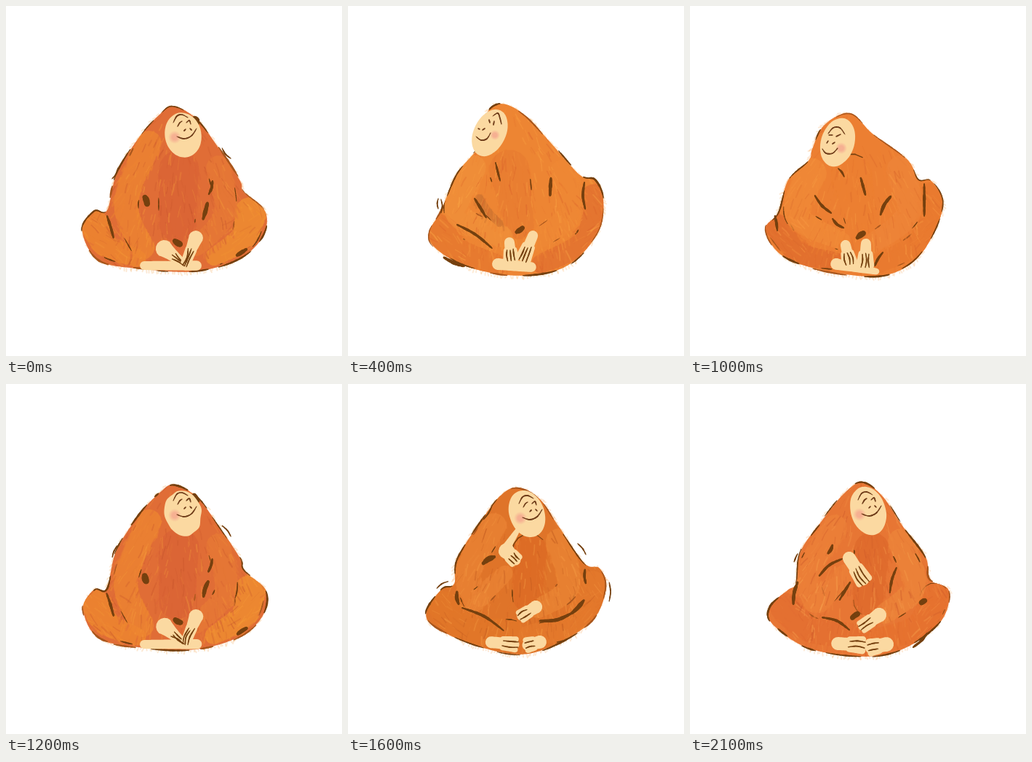
An HTML page with a canvas that plays this animation: 462 px wide and 480 px high, repeating every 2.2 s.

```html
<!DOCTYPE html>
<html lang="en">
<head>
<meta charset="utf-8">
<title>Orangutan</title>
<style>
html, body { margin: 0; width: 100%; height: 100%; overflow: hidden; background: #fff; }
canvas { display: block; width: 462px; height: 480px; }
</style>
</head>
<body>
<canvas id="stage" width="462" height="480"></canvas>
<script>
const W = 462, H = 480, STEP = 100;
const INK = '#75400f', SKIN = '#fbd9a1';
const numbers = s => s.trim().split(/\s+/).map(Number);
const pairs = n => Array.from({ length: n.length >> 1 }, (_, i) => [n[2 * i], n[2 * i + 1]]);

function random(seed) {
  return () => {
    seed = seed + 0x6D2B79F5 | 0;
    let t = Math.imul(seed ^ seed >>> 15, 1 | seed);
    t = t + Math.imul(t ^ t >>> 7, 61 | t) ^ t;
    return ((t ^ t >>> 14) >>> 0) / 4294967296;
  };
}

// Catmull-Rom curve sampled every couple of pixels.
function curve(p, closed) {
  const n = p.length, out = [];
  const at = i => closed ? p[(i + n) % n] : p[Math.max(0, Math.min(n - 1, i))];
  for (let i = 0; i < (closed ? n : n - 1); i++) {
    const [a, b, c, d] = [at(i - 1), at(i), at(i + 1), at(i + 2)];
    const m = Math.max(2, Math.ceil(Math.hypot(c[0] - b[0], c[1] - b[1]) / 2));
    for (let k = 0; k < m; k++) {
      const t = k / m;
      out.push([0, 1].map(j => b[j] + .5 * t * (c[j] - a[j] + t * (2 * a[j] - 5 * b[j] + 4 * c[j] - d[j]
        + t * (3 * (b[j] - c[j]) + d[j] - a[j])))));
    }
  }
  if (!closed) out.push(p[n - 1]);
  return out;
}

// Closed outline of a round-ended limb whose half-width runs from w0 to w1.
function tube(p, w0, w1) {
  const c = curve(p), n = c.length - 1, left = [], right = [];
  const turn = i => {
    const a = c[Math.max(0, i - 1)], b = c[Math.min(n, i + 1)];
    return Math.atan2(b[1] - a[1], b[0] - a[0]);
  };
  const put = (list, i, w, angle) =>
    list.push([c[i][0] + w * Math.cos(angle), c[i][1] + w * Math.sin(angle)]);
  for (let i = 0; i <= n; i++) {
    const w = w0 + (w1 - w0) * i / n, a = turn(i);
    put(left, i, w, a - Math.PI / 2);
    put(right, i, w, a + Math.PI / 2);
  }
  const tip = [], root = [];
  for (let k = 1; k < 8; k++) {
    const a = Math.PI * (k / 8 - .5);
    put(tip, n, w1, turn(n) + a);
    put(root, 0, w0, turn(0) + Math.PI + a);
  }
  return [...left, ...tip, ...right.reverse(), ...root];
}

// Face lines as "width x y x y / ...", cheek as x, y, radius.
const looks = {
  up: {
    cheek: [232, 180, 9],
    lines: '2 230 160 235 151 242 149 250 153/2 236 165 239 160 242 158/2 248 160 252 157 254 162/2 245 171 247 169/2 253 168 255 170/2 235 179 245 182 255 178 262 168'
  },
  side: {
    cheek: [202, 177, 7],
    lines: '2 199 151 206 147 209 154 211 162/2 194 156 195 160/2 201 158 200 163/2 179 168 181 169/2 185 170 188 168/2 176 179 183 184 191 182 196 174'
  },
  calm: {
    cheek: [208, 195, 8],
    lines: '2 190 175 197 167 206 167 213 176/2 191 177 196 177/2 201 179 207 176/2 188 188 190 185/2 196 189 199 187/2 182 196 187 202 196 202 203 195'
  },
  pout: {
    cheek: [233, 178, 9],
    lines: '2 230 160 234 153 240 158 245 155 251 158/2 236 164 243 161/2 244 167 247 165/2 241 172 243 174/3 252 171 253 177/2 256 170 258 176'
  }
};

// limbs: "colour w0 w1 x y ..."   hands: "x0 y0 x1 y1 w0 w1 fingerLines"   ink: "width x y x y"
const poses = {};

poses.rest = {
  base: '#e06d36', light: '#f39a3a', dark: '#c4532b', crown: [235, 130],
  outline: '211 149 230 137 262 155 294 197 322 240 327 255 357 283 352 318 320 347 262 364 190 361 128 349 105 308 122 281 139 280 152 230 184 179',
  limbs: '#ef892e 20 12 122 300 138 328 180 346/#f0902f 22 12 336 284 326 318 286 344/#da6335 28 24 238 225 235 300/#ee8630 17 16 197 188 165 270 188 332/#e77a35 17 13 292 222 301 285 262 330',
  hands: '190 356 262 356 6 8 0/218 333 241 351 12 5 3/261 318 248 350 10 6 3',
  ink: '9 191 262 194 272/6 277 270 271 292/4 284 240 279 258/9 232 322 240 327/7 259 153 264 161/4 139 288 148 318/6 318 342 330 334/2 146 237 154 222/2 297 195 309 209',
  face: [243.5, 177, 25, 31, -.2], look: 'up', shift: [0, 0]
};

poses.left = {
  base: '#ed8533', light: '#faa645', dark: '#d8622a', crown: [222, 128],
  outline: '185 163 196 140 217 135 246 152 280 189 319 232 340 239 351 268 343 312 300 357 236 370 165 358 119 331 112 309 128 281 149 231 178 195',
  limbs: '#e6772e 20 14 125 305 150 335 205 355/#e2702f 18 13 338 262 328 320 265 354/#e87c30 28 20 222 225 236 300/#f1903a 18 15 172 222 150 283 212 317/#ef8834 20 13 297 230 305 285 252 325/#cf7430 6 5 180 264 194 284 208 298',
  hands: '206 354 252 358 8 8 0/222 324 224 345 7 9 3/254 315 242 344 7 9 3',
  ink: '4 174 264 190 290/5 279 236 278 260/8 232 310 240 304/4 325 242 326 278/4 150 300 198 332/5 132 345 160 357/3 203 215 209 240/2 124 264 124 278/2 128 265 128 284',
  face: [195, 174, 22, 34, .45], look: 'side', shift: [0, 0]
};

poses.low = {
  base: '#ec7f32', light: '#f79c43', dark: '#d9682b', crown: [225, 140],
  outline: '168 196 184 164 219 147 252 176 299 211 314 238 332 240 348 273 328 325 299 357 254 371 180 362 125 341 104 306 121 283 135 239 163 212',
  limbs: '#df6b2d 17 12 120 302 150 338 200 350/#e9792e 18 13 332 260 318 320 258 354/#ec7f30 28 20 222 230 236 300/#f08a37 22 12 166 230 148 288 210 323/#ee8439 20 13 290 225 300 285 247 328',
  hands: '201 354 256 364 8 5 0/214 328 219 350 7 9 3/242 326 241 353 7 10 3',
  ink: '4 172 260 194 284/4 196 292 211 304/4 235 236 241 259/5 276 261 262 286/8 230 318 239 311/4 322 244 322 288/4 117 288 120 308/4 265 338 254 356/3 204 223 212 234',
  face: [203, 187, 23, 34, .3], look: 'calm', shift: [0, 0]
};

poses.think = {
  base: '#df7429', light: '#f49c43', dark: '#bd571f', crown: [235, 132],
  outline: '211 152 234 142 264 158 290 196 325 246 346 253 355 280 337 323 286 357 236 371 174 358 119 333 108 312 129 281 146 274 150 240 185 185',
  limbs: '#e27729 22 17 132 306 165 336 225 340/#e57a2d 20 14 336 276 310 328 248 345/#dc6a25 24 20 250 230 246 292/#ea8534 18 13 290 216 303 278 262 308/#ea8335 17 18 201 194 166 255 174 294/#ea8335 14 11 182 292 216 260',
  hands: '214 230 236 196 7 3 0/218 229 230 241 11 9 3/258 306 239 318 9 8 2/197 354 228 357 8 9 2/264 354 247 358 9 9 2',
  ink: '8 186 246 201 237/5 150 285 152 302/4 157 307 214 338/5 264 325 308 314/6 308 314 324 297/4 326 255 327 273/2 122 280 138 271/2 186 186 198 167/2 316 219 327 234/2 359 272 359 298',
  face: [246, 178, 24, 33, -.35], look: 'up', shift: [5, 4]
};

poses.chest = {
  base: '#e77634', light: '#f6a04d', dark: '#ca5729', crown: [238, 128],
  outline: '211 151 236 135 264 153 292 194 324 238 329 268 356 283 345 325 296 362 237 374 162 362 113 329 110 305 134 283 146 273 152 230 181 188',
  limbs: '#e36e31 20 16 130 306 165 336 225 345/#e6712e 20 14 336 293 312 334 255 350/#de692b 25 20 250 228 245 298/#ec853a 18 14 290 216 308 278 268 315/#ec8138 17 16 199 196 165 255 171 298/#ec8138 16 13 178 298 213 260',
  hands: '219 239 238 268 9 10 3/260 317 238 332 10 8 2/203 356 235 358 9 10 2/270 357 249 361 10 10 2',
  ink: '4 178 263 209 240/5 190 232 196 221/4 220 272 206 296/8 223 321 231 315/5 148 272 142 302/4 182 320 219 337/4 284 252 275 286/8 318 300 323 297/4 307 361 326 342/2 143 244 148 233/2 310 233 316 244',
  face: [245, 174, 24, 34, -.3], look: 'up', shift: [1, -1]
};

function paint(pose, seed, lookName = pose.look) {
  const cv = document.createElement('canvas');
  cv.width = W; cv.height = H;
  const g = cv.getContext('2d'), rnd = random(seed);
  const vary = r => (rnd() * 2 - 1) * r;
  const wobble = seed % 2 ? .2 : 1.2;
  const shake = p => p.map(([x, y]) => [x + vary(wobble), y + vary(wobble)]);
  g.lineCap = g.lineJoin = 'round';

  function trace(p) {
    const path = new Path2D();
    p.forEach(q => path.lineTo(...q));
    path.closePath();
    return path;
  }

  function fill(p, color, alpha = 1) {
    g.globalAlpha = alpha;
    g.fillStyle = color;
    g.fill(trace(p));
    g.globalAlpha = 1;
  }

  function hair(x, y, angle, length, width, color, alpha) {
    const bend = angle + vary(.2);
    g.globalAlpha = alpha;
    g.strokeStyle = color;
    g.lineWidth = width;
    g.beginPath();
    g.moveTo(x, y);
    g.quadraticCurveTo(x + Math.cos(bend) * length / 2, y + Math.sin(bend) * length / 2,
      x + Math.cos(angle) * length, y + Math.sin(angle) * length);
    g.stroke();
    g.globalAlpha = 1;
  }

  function brush(p, width, color = INK) {
    g.strokeStyle = color;
    for (let i = 1; i < p.length; i++) {
      g.lineWidth = width * (.45 + .5 * Math.sin(Math.PI * i / p.length)) * (.8 + rnd() * .35);
      g.beginPath();
      g.moveTo(...p[i - 1]);
      g.lineTo(...p[i]);
      g.stroke();
    }
  }

  // Straight mark with a slight random bow.
  function mark(width, x0, y0, x1, y1) {
    const bow = vary(.1);
    const mid = [(x0 + x1) / 2 + (y1 - y0) * bow, (y0 + y1) / 2 - (x1 - x0) * bow];
    brush(curve(shake([[x0, y0], mid, [x1, y1]])), width);
  }

  function contour(p, width, run, gap) {
    for (let i = Math.floor(rnd() * gap); i < p.length;) {
      const size = run * (.4 + rnd()), dx = vary(.8), dy = vary(.8);
      brush(p.slice(i, i + size).map(([x, y]) => [x + dx, y + dy]),
        width * (.7 + rnd() * .7), rnd() < .3 ? '#a9571d' : INK);
      i += Math.floor(size + gap * (.3 + rnd()));
    }
  }

  function flow(x, y) {
    if (y > 285 && Math.abs(x - 235) > 78) return x < 235 ? .75 : 2.4;
    return Math.atan2(y - pose.crown[1], (x - pose.crown[0]) * .8);
  }

  function fur(p, color, density) {
    const xs = p.map(q => q[0]), ys = p.map(q => q[1]);
    const x0 = Math.min(...xs), y0 = Math.min(...ys);
    const w = Math.max(...xs) - x0, h = Math.max(...ys) - y0;
    g.save();
    g.clip(trace(p));
    for (let i = w * h * density; i > 0; i--) {
      const x = x0 + rnd() * w, y = y0 + rnd() * h, pick = rnd();
      const tone = pick < .4 ? pose.light : pick < .75 ? pose.dark : color;
      hair(x, y, flow(x, y) + vary(.3), 6 + rnd() * 14, .7 + rnd() * 1.6, tone, .13 + rnd() * .32);
    }
    g.restore();
  }

  function limb(text) {
    const [color, ...rest] = text.split(' ');
    const [w0, w1, ...n] = rest.map(Number);
    const p = tube(shake(pairs(n)), w0, w1);
    fill(p, color, .75);
    for (let i = 0; i < p.length; i += 3) {
      hair(...p[i], flow(...p[i]) + vary(.3), 8, 2.4, rnd() < .5 ? color : pose.base, .45);
    }
    fur(p, color, .009);
    contour(p, 1.6, 9, 50);
  }

  function hand(text) {
    const [x0, y0, x1, y1, w0, w1, fingers] = numbers(text);
    const [a, b] = shake([[x0, y0], [x1, y1]]);
    const d = Math.atan2(b[1] - a[1], b[0] - a[0]);
    const at = (t, s) => {
      const w = (w0 + (w1 - w0) * t) * s;
      return [a[0] + (b[0] - a[0]) * t - Math.sin(d) * w, a[1] + (b[1] - a[1]) * t + Math.cos(d) * w];
    };
    fill(tube([a, b], w0, w1 * .85), SKIN);
    for (let k = 0; k <= fingers && fingers; k++) {
      const s = 2 * k / fingers - 1;
      fill(tube([at(.5, s * .7), at(1.08, s * .8)], w1 * .4, w1 * .42), SKIN);
    }
    for (let k = 0; k < fingers; k++) {
      const s = (2 * k + 1) / fingers - 1;
      mark(2, ...at(.45 + rnd() * .15, s * .8), ...at(1.2, s * .8));
    }
  }

  function face() {
    const [cx, cy, rx, ry, tilt] = pose.face, rim = [];
    for (let k = 0; k < 16; k++) {
      const a = k * Math.PI / 8, x = rx * Math.cos(a), y = ry * Math.sin(a);
      rim.push([cx + x * Math.cos(tilt) - y * Math.sin(tilt), cy + x * Math.sin(tilt) + y * Math.cos(tilt)]);
    }
    fill(curve(shake(rim), true), SKIN);
    const look = looks[lookName], [x, y, r] = look.cheek;
    g.save();
    g.translate(...pose.shift);
    const blush = g.createRadialGradient(x, y, r * .4, x, y, r);
    blush.addColorStop(0, 'rgba(245,169,143,.85)');
    blush.addColorStop(1, 'rgba(245,169,143,0)');
    g.fillStyle = blush;
    g.fillRect(x - r, y - r, 2 * r, 2 * r);
    for (const s of look.lines.split('/')) {
      const [width, ...n] = numbers(s);
      brush(curve(pairs(n)), width * .95, '#6f3d1a');
    }
    g.restore();
  }

  const body = curve(shake(pairs(numbers(pose.outline))), true);
  for (let i = 0; i < body.length; i += 2) {
    const [x, y] = body[i];
    hair(x + vary(1.5), y + vary(1.5), flow(x, y) + vary(.5), 4, 2, pose.light, .22);
  }
  fill(body, pose.base);
  fur(body, pose.base, .006);
  g.save();
  g.clip(trace(body));
  pose.limbs.split('/').forEach(limb);
  g.restore();
  contour(body, 2.2, 20, 12);
  pose.ink.split('/').forEach(s => mark(...numbers(s)));
  face();
  pose.hands.split('/').forEach(hand);
  return cv;
}

const cels = {};
Object.keys(poses).forEach((name, i) => {
  for (const k of [1, 2]) cels[name + k] = paint(poses[name], 100 + i * 20 + k);
});
for (const k of [1, 2]) cels['pout' + k] = paint(poses.think, 160 + k, 'pout');

const order = ('rest1 rest2 rest1 left2 left1 left2 left1 left1 low1 low2 low1 rest1 rest2 rest1 '
  + 'think1 think2 think1 pout2 pout1 pout2 chest2 chest1').split(' ');
const ctx = document.getElementById('stage').getContext('2d');
const start = performance.now();
let shown = '';

function draw() {
  const name = order[Math.floor(Math.max(0, performance.now() - start) / STEP) % order.length];
  if (name !== shown) {
    ctx.fillStyle = '#fff';
    ctx.fillRect(0, 0, W, H);
    ctx.drawImage(cels[name], 0, 0);
    shown = name;
  }
  requestAnimationFrame(draw);
}
draw();
</script>
</body>
</html>
```
